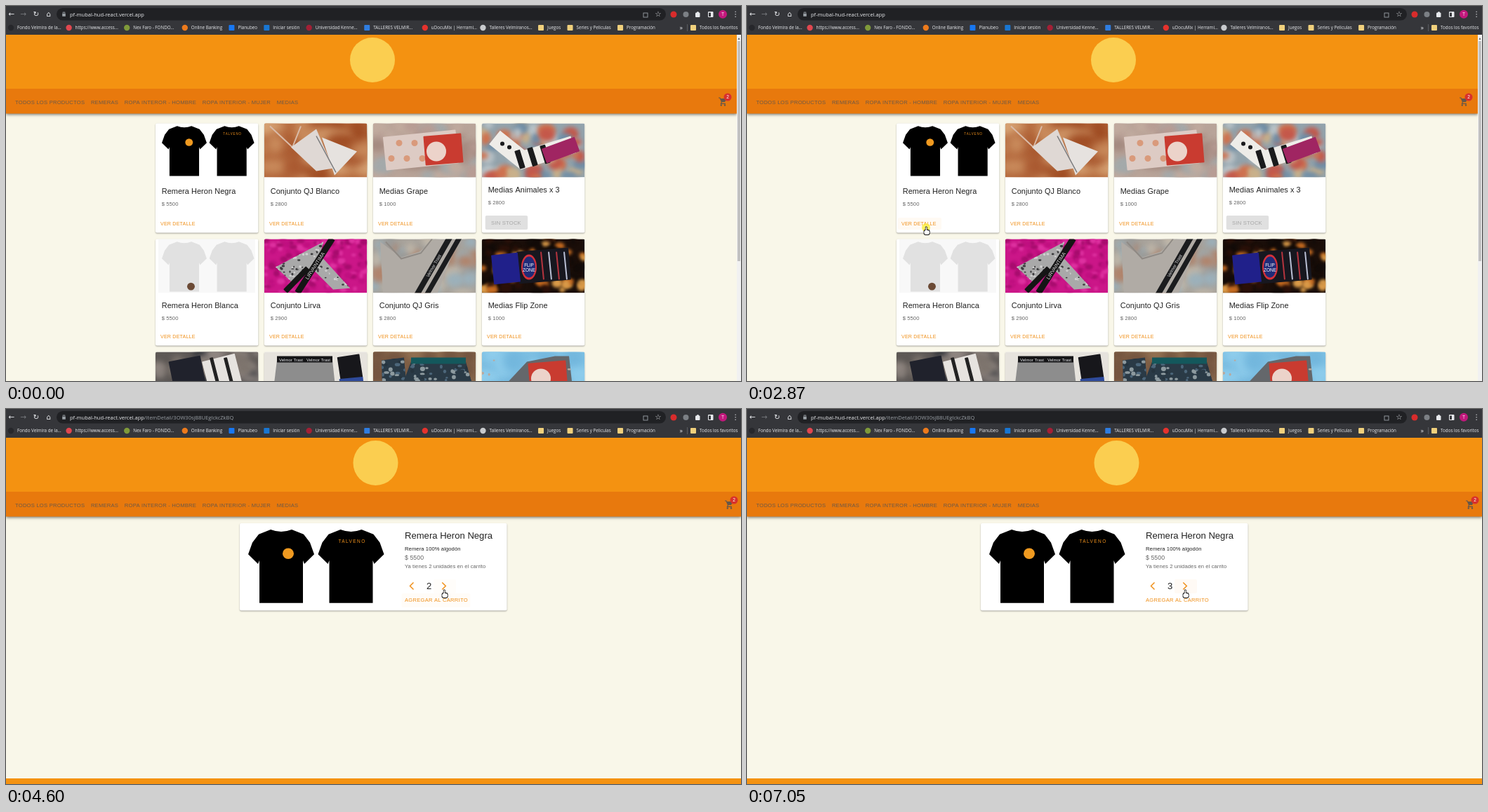
Recreate the animation shown at these times as an HTML page with a canvas. Size 1047 by 535 pixels, loop 8000 ms.

```html
<!DOCTYPE html>
<html lang="es">
<head>
<meta charset="utf-8">
<title>Tienda</title>
<style>
html, body { margin: 0; width: 100%; height: 100%; overflow: hidden; background: #f9f7e9; }
canvas { display: block; width: 1047px; height: 535px; }
</style>
</head>
<body>
<canvas id="stage" width="1047" height="535"></canvas>
<script>
const W = 1047, H = 535, LOOP = 8000, SCALE = W / 1920;
const ORANGE = '#f0911c', INK = '#212121', GREY = '#666', PAPER = '#f9f7e9', LIGHT = '#e8eaed';
const SANS = '"Liberation Sans", Arial, sans-serif', UI = '"Open Sans", sans-serif', GLYPHS = '"DejaVu Sans", sans-serif';
// Type styles: size and letter spacing in unscaled pixels
const STYLES = { h5: [24, 0], h6: [20, .15], price: [16, .15], body: [14, .15], button: [14, .4], small: [13, .37] };
const stage = document.getElementById('stage').getContext('2d');
let c = stage;

// Drawing helpers
function rect(color, x, y, w, h, r = 0) {
  c.fillStyle = color;
  c.beginPath();
  c.roundRect(x, y, w, h, r);
  c.fill();
}
function disc(color, x, y, r, ry = r) {
  c.fillStyle = color;
  c.beginPath();
  c.ellipse(x, y, r, ry, 0, 0, 7);
  c.fill();
}
function trace(points) {
  c.beginPath();
  for (let i = 0; i < points.length; i += 2) c.lineTo(points[i], points[i + 1]);
}
function poly(color, ...points) {
  trace(points);
  c.fillStyle = color;
  c.fill();
}
function line(color, width, ...points) {
  trace(points);
  c.strokeStyle = color;
  c.lineWidth = width;
  c.stroke();
}
function slab(color, x, y, w, h, angle, caption) {
  c.save();
  c.translate(x, y);
  c.rotate(angle);
  rect(color, -w / 2, -h / 2, w, h, 1);
  if (caption) text(caption, 0, h * .3, h * .8, '#ddd', 0, SANS, 'center');
  c.restore();
}
function text(s, x, y, size, color, spacing = 0, font = SANS, align = 'left') {
  c.font = size + 'px ' + font;
  c.letterSpacing = spacing + 'px';
  c.textAlign = align;
  c.fillStyle = color;
  c.fillText(s, x, y);
  return c.measureText(s).width;
}
function type(style, s, x, y, color = GREY, align) {
  const [size, spacing] = STYLES[style];
  return text(s, x, y, size * SCALE, color, spacing * SCALE, SANS, align);
}
function card(x, y, w, h) {
  c.save();
  c.shadowColor = 'rgba(0,0,0,.35)';
  c.shadowBlur = 2;
  c.shadowOffsetY = 1;
  rect('#fff', x, y, w, h, 2);
  c.restore();
}

// Browser frame
function browser(path) {
  rect('#35363a', 0, 0, W, 41);
  rect('#202124', 72, 3, 868, 17.5, 9);
  const icons = { '←': 8, '→': 25, '↻': 43, '⌂': 60.5, '☆': 929, '⋮': 1039 };
  for (const icon in icons)
    text(icon, icons[icon], 15.3, 10.5, icon === '→' ? '#77797d' : LIGHT, 0, GLYPHS, 'center');
  rect('#9aa0a6', 80.2, 11, 4.6, 3.8);
  c.strokeStyle = '#9aa0a6';
  c.lineWidth = .9;
  c.strokeRect(81.2, 9, 2.6, 2.5);
  c.strokeRect(908, 10, 6, 6);
  const host = text('pf-mubal-hud-react.vercel.app', 91, 14.5, 7.5, LIGHT, 0, UI);
  if (path) text(path, 91 + host, 14.5, 7.5, '#9aa0a6', 0, UI);
  disc('#d92c2c', 951, 12, 4.5);
  disc('#7c8085', 968.5, 12, 4);
  rect(LIGHT, 982, 9.5, 6.5, 6.5, 1);
  disc(LIGHT, 985.5, 9.5, 1.6);
  rect(LIGHT, 1000, 8, 7.5, 8, 1);
  rect('#35363a', 1001, 9.5, 3, 5.5);
  disc('#c2187c', 1021, 11.8, 6);
  text('T', 1021, 14.2, 6.5, '#fff', 0, UI, 'center');
  bookmarks();
}
function bookmark(name, x, shape, color) {
  if (shape === 'disc') disc(color, x - 9, 31, 4.2);
  else rect(color, x - 13, 27, 8, 8, 1);
  return text(name, x, 33.3, 6.25, LIGHT, 0, UI);
}
function bookmarks() {
  const folder = '#f0d07c', items = [
    ['Fondo Velmira de la...', 'disc', '#26272b'], ['https://www.access...', 'disc', '#e0474f'],
    ['Nex Faro - FONDO...', 'disc', '#7f9a3a'], ['Online Banking', 'disc', '#ec7a1c'],
    ['Planubeo', 'square', '#1877f2'], ['Iniciar sesión', 'square', '#1976d2'],
    ['Universidad Kenne...', 'disc', '#a32035'], ['TALLERES VELMIR...', 'square', '#2f7de0'],
    ['uDocuMix | Herrami...', 'disc', '#e5322d'], ['Talleres Velmiranos...', 'disc', '#c8cacd'],
    ['Juegos', 'square', folder], ['Series y Peliculas', 'square', folder], ['Programación', 'square', folder]
  ];
  let x = 16;
  for (const [name, shape, color] of items) {
    const width = bookmark(name, x, shape, color);
    x += (name.endsWith('...') ? 60.3 : width) + 22.3; // shortened names share one width
  }
  text('»', 959.5, 33.5, 9, LIGHT, 0, UI);
  rect('#65686c', 970, 26, .8, 10);
  bookmark('Todos los favoritos', 988, 'square', folder);
}

function header(width) {
  const shift = width > 1041 ? 9 : 0, ink = '#65574a';
  rect(PAPER, 0, 41, W, H);
  c.save();
  c.shadowColor = 'rgba(0,0,0,.5)';
  c.shadowBlur = 4;
  c.shadowOffsetY = 1.5;
  rect('#e8790d', 0, 118, width, 35.5);
  c.restore();
  rect('#f49211', 0, 41, width, 77);
  disc('#fbce50', 522 + shift / 2, 77, 32);
  let x = 13;
  for (const name of ['TODOS LOS PRODUCTOS', 'REMERAS', 'ROPA INTEROR - HOMBRE', 'ROPA INTERIOR - MUJER', 'MEDIAS'])
    x += type('button', name, x, 139.5, '#6d5947') + 8.7;
  c.save();
  c.translate(1015 + shift, 131);
  line(ink, 1.2, 0, 0, 2, 0, 4.5, 6, 3.5, 8.3, 10, 8.3);
  poly(ink, 2.5, 1, 11.5, 1, 9, 6, 4.5, 6);
  disc(ink, 3.8, 10.5, 1.2);
  disc(ink, 9, 10.5, 1.2);
  disc('#d8302c', 13, -1, 5.5);
  text('2', 13, 1.4, 6.6, '#fff', 0, SANS, 'center');
  c.restore();
}

// Product pictures, each 146 by 77
function scatter(seed, count, size, ...colors) {
  const random = () => (seed = seed * 16807 % 2147483647) / 2147483647;
  for (let i = 0; i < count; i++)
    disc(colors[i % colors.length], random() * 146, random() * 77, size * (.4 + random() * .6), size * (.3 + random() * .5));
}
function backdrop(seed, size, base, ...colors) {
  rect(base, 0, 0, 146, 77);
  c.filter = `blur(${size / 4}px)`;
  scatter(seed, 900 / size, size, ...colors);
  c.filter = 'none';
}
function patterned(seed, size, colors, ...points) {
  c.save();
  poly(colors[0], ...points);
  c.clip();
  scatter(seed, 900 / size, size, ...colors);
  c.restore();
}
function tee(cx) {
  const half = [[15, 1], [32, 8], [41, 20], [47, 37], [33, 51], [31, 46], [31, 108]];
  c.beginPath();
  for (const [x, y] of half) c.lineTo(cx + x, y);
  for (const [x, y] of half.reverse()) c.lineTo(cx - x, y);
  c.quadraticCurveTo(cx, 7, cx + 15, 1);
  c.fill();
}
function shirts(x, y, scale, color, badge, badgeX, badgeY) {
  c.save();
  c.translate(x, y);
  c.scale(scale, scale * .98);
  c.fillStyle = color;
  tee(47);
  tee(146.5);
  disc(badge, badgeX, badgeY, 8);
  c.restore();
}
function eagleTees(x, y, scale) {
  shirts(x, y, scale, '#000', '#f09a20', 57, 36);
  text('TALVENO', x + 148 * scale, y + 20 * scale, 6.5 * scale, ORANGE, 1.4 * scale, SANS, 'center');
}
function redPack(x, y) {
  slab('#c93b30', x + 10, y - 3, 54, 42, -.08);
  disc('#ecd3ca', x, y, 14);
}
const photos = [
  () => eagleTees(9, 3, .68),
  () => {
    backdrop(11, 26, '#b4673a', '#c98b5c', '#a04d24', '#d6a273', '#aa5a31');
    line('#d9bba8', 2, 8, 4, 40, 34, 52, 4);
    poly('#dfd8d4', 38, 34, 74, 8, 98, 64, 74, 68);
    poly('#e6e2df', 82, 20, 132, 40, 100, 74);
    line('#77787a', 1.5, 74, 18, 102, 70);
  },
  () => {
    backdrop(23, 18, '#b8a499', '#c0aa9e', '#a48a80', '#b79c94', '#a3a9aa');
    slab('#ddcbc4', 68, 38, 104, 48, -.1);
    for (let i = 0; i < 5; i++) disc('#d99a7b', 26 + i * 11, i % 2 ? 28 : 50, 4.5);
    redPack(90, 40);
  },
  () => {
    backdrop(47, 13, '#93a3ac', '#c9b08a', '#d0714c', '#6f8da6', '#b9c3c8', '#c4584a');
    line('#eeece8', 25, 18, 20, 58, 52, 130, 30);
    for (const x of [54, 72, 90]) slab('#1a1a1c', x, 62 - x / 5, 8, 27, -.3);
    slab('#a02562', 112, 38, 50, 22, -.35);
    disc('#1a1a1c', 29, 29, 3);
    disc('#1a1a1c', 39, 34, 3);
  },
  () => {
    rect('#f8f8f8', 4, 0, 138, 77);
    shirts(9, 3, .68, '#e1e1e1', '#6b4a35', 61, 97);
  },
  () => {
    const zebra = ['#a9a9a9', '#3c3c3e', '#d0d0d0'];
    backdrop(5, 6, '#cb1688', '#dd309f', '#a80c6e', '#c01080');
    patterned(31, 2.4, zebra, 16, 40, 84, 4, 76, 36, 40, 62);
    patterned(37, 2.4, zebra, 64, 38, 84, 28, 122, 70, 98, 72);
    slab('#151515', 72, 38, 92, 9, -1, 'LIRVAINTIMA');
    slab('#151515', 46, 58, 46, 8, -.8);
  },
  () => {
    backdrop(67, 16, '#a7a29b', '#9bb0ba', '#b0846c', '#9a9a98', '#bfb6a8');
    poly('#b0aba5', 10, 4, 40, 26, 66, 18, 88, 0, 120, 2, 92, 77, 14, 77);
    line('#8f8a85', 2, 18, 4, 40, 28, 68, 20, 84, 0);
    slab('#1b1c1e', 86, 38, 100, 8, -1.05, 'Velmor Trast');
    slab('#1b1c1e', 100, 38, 100, 7, -1.05);
  },
  () => {
    backdrop(83, 9, '#1a0e09', '#c46a20', '#2a1008', '#120b08', '#d99a48', '#120b08');
    slab('#17171f', 88, 38, 74, 46, -.08);
    slab('#20208a', 34, 42, 38, 42, -.1);
    for (let i = 0; i < 4; i++) slab(i % 2 ? '#b9bfd4' : '#b5343e', 86 + i * 11, 38, 2, 40, -.1);
    disc('#d5303a', 67, 40, 11, 18);
    disc('#202b78', 67, 40, 9, 15);
    text('FLIP', 67, 39, 6.5, '#fff', 0, SANS, 'center');
    text('ZONE', 67, 46, 6.5, '#fff', 0, SANS, 'center');
  },
  () => {
    backdrop(91, 16, '#5d5855', '#7d746d', '#34363c', '#8e8580');
    slab('#20222c', 46, 34, 46, 50, -.2);
    slab('#e6e3df', 98, 42, 48, 70, -.25);
    for (const x of [88, 108]) slab('#222', x, 42, 5, 70, -.25);
  },
  () => {
    rect('#e6e3dd', 0, 0, 146, 77);
    poly('#8d8d8d', 18, 12, 97, 12, 104, 77, 10, 77);
    rect('#151517', 18, 6, 79, 9);
    for (const x of [38, 77]) text('Velmor Trast', x, 13, 6, LIGHT, 0, SANS, 'center');
    slab('#17171b', 122, 22, 32, 34, -.15);
    slab('#2e4a9a', 124, 42, 34, 10, -.1);
  },
  () => {
    backdrop(19, 20, '#85664b', '#927051', '#755640');
    const print = ['#2a3a46', '#8d9a9f', '#4c667a', '#26343e'];
    patterned(13, 4, print, 12, 12, 44, 8, 50, 77, 14, 77);
    patterned(17, 4, print, 54, 14, 132, 14, 150, 77, 30, 77);
    rect('#14585c', 54, 8, 78, 9);
  },
  () => {
    backdrop(29, 24, '#7fc3e6', '#8fcdec', '#73b7dd');
    poly('#64676b', 36, 44, 64, 14, 104, 6, 124, 6, 132, 77);
    scatter(41, 6, 3, '#b9a89c');
    redPack(84, 38);
  }
];
const products = [['Remera Heron Negra', 5500], ['Conjunto QJ Blanco', 2800], ['Medias Grape', 1000], ['Medias Animales x 3', 2800],
  ['Remera Heron Blanca', 5500], ['Conjunto Lirva', 2900], ['Conjunto QJ Gris', 2800], ['Medias Flip Zone', 1000]];

// Pages
function catalogue() {
  browser();
  header(1041);
  rect('#f1f1f1', 1041, 41, 6, H);
  rect('#c1c1c1', 1042, 50, 4, 314);
  text('▴', 1044, 47.5, 6, '#606060', 0, GLYPHS, 'center');
  photos.forEach((paint, i) => {
    const row = Math.floor(i / 4), x = 213 + 155 * (i % 4), y = 167.5 + 163 * row + (row ? 2 : 0) - (row > 1 ? 2 : 0);
    const soldOut = i === 3, title = y + (soldOut ? 98.5 : row ? 98.5 : 100.5);
    card(x, y, 146.3, row ? 152 : 156);
    c.save();
    c.translate(x, y);
    c.beginPath();
    c.roundRect(0, 0, 146.3, 76.7, [2, 2, 0, 0]);
    c.clip();
    paint();
    c.restore();
    if (!products[i]) return;
    const [name, price] = products[i];
    type('h6', name, x + 8.7, title, INK);
    type('body', '$ ' + price, x + 8.7, title + 17);
    if (soldOut) {
      rect('#e0e0e0', x + 4.7, y + 131.5, 60.5, 20, 2);
      type('button', 'SIN STOCK', x + 13, y + 144.1, '#a6a6a6');
    } else type('small', 'VER DETALLE', x + 7, title + (row ? 43 : 44.7), ORANGE);
  });
}
function detailFrame() {
  browser('/itemDetail/3OW30sjB8UEgIckcZkBQ');
  header(W);
  rect('#f49211', 0, 527, W, 8);
}
function chevrons(x, y, gap) {
  for (const side of [-1, 1]) {
    const tip = x + side * gap;
    line(ORANGE, 1.5, tip - 2.5 * side, y - 5, tip + 2.5 * side, y, tip - 2.5 * side, y + 5);
  }
}
function loading() {
  detailFrame();
  card(457, 163, 133, 130);
  c.strokeStyle = '#bbb';
  c.lineWidth = .8;
  c.strokeRect(457.4, 163.4, 43.2, 129.2);
  type('price', '$', 509.5, 185);
  ['Ya tienes 2', 'unidades en el', 'carrito'].forEach((s, i) => type('body', s, 509.5, 197 + i * 11));
  chevrons(542.3, 245, 23.2);
  type('h5', '2', 543.7, 248.5, INK, 'center');
  type('button', 'AGREGAR AL', 545, 267.6, ORANGE, 'center');
  type('button', 'CARRITO', 545, 281.2, ORANGE, 'center');
}
function detail() {
  detailFrame();
  card(333, 163, 380.5, 124.5);
  eagleTees(345, 171, 1);
  type('h5', 'Remera Heron Negra', 568, 184.8, INK);
  type('body', 'Remera 100% algodón', 568, 201.7, INK);
  type('price', '$ 5500', 568, 215);
  type('body', 'Ya tienes 2 unidades en el carrito', 568, 227);
  chevrons(600.9, 252.5, 22.9);
  type('button', 'AGREGAR AL CARRITO', 568, 275.2, ORANGE);
}
function cached(paint) {
  const sheet = document.createElement('canvas');
  sheet.width = W;
  sheet.height = H;
  c = sheet.getContext('2d');
  paint();
  c = stage;
  return sheet;
}
const pages = [catalogue, loading, detail].map(cached);

// Pointer and interaction
const box = (page, x, y, w, h) => ({ page, x, y, w, h });
const VIEW = box(0, 215, 302, 62, 17), LESS = box(2, 563.5, 243, 31, 20);
const MORE = box(2, 609, 243, 32, 20), ADD = box(2, 563.5, 263, 98, 20), buttons = [VIEW, LESS, MORE, ADD];
const overMore = [624, 257.5];
const moves = [
  { from: 260, to: 1030, end: [347, 237], lift: 143 }, { from: 1030, to: 1850, end: [294, 205] },
  { from: 1850, to: 2610, end: [255, 314.5] }, { from: 3200, to: 3910, end: [612, 274] },
  { from: 4390, to: 4600, end: overMore }, { from: 4880, to: 5090, end: [579, 256] },
  { from: 5430, to: 5640, end: overMore }
];
const clicks = [{ on: VIEW, at: 2870, add: 0 }, { on: LESS, at: 5100, add: -1 },
  { on: MORE, at: 5850, add: 1 }, { on: MORE, at: 6410, add: 1 }];

const clamp = v => Math.max(0, Math.min(1, v));
const pageAt = t => t < 3000 ? 0 : t < 3200 ? 1 : 2;

function pointer(time) {
  const t = 260 + Math.floor((time - 260) / 70) * 70;
  let x = 981, y = 505;
  for (const { from, to, end, lift = 0 } of moves) {
    const p = clamp((t - from) / (to - from)), e = p * p * (3 - 2 * p);
    x += (end[0] - x) * e;
    y += (end[1] - y) * e - lift * Math.sin(Math.PI * e);
  }
  return [x, y];
}
function isOver(b, t) {
  const [x, y] = pointer(t);
  return pageAt(t) === b.page && x > b.x && x < b.x + b.w && y > b.y && y < b.y + b.h;
}
function drawPointer(x, y, hand) {
  c.save();
  c.translate(x, y);
  if (hand) {
    for (const [color, inset] of [['#111', 0], ['#fff', .8]]) {
      rect(color, -3.4 + inset, 4.6 + inset, 9 - 2 * inset, 7.8 - 2 * inset, 2.4);
      rect(color, -1.2 + inset, inset, 3 - 2 * inset, 9 - 2 * inset, 1.4);
    }
  } else {
    const arrow = [0, 0, 0, 9, 2, 7.2, 3.4, 10.2, 4.8, 9.6, 3.4, 6.6, 6.2, 6.6, 0, 0];
    poly('#fff', ...arrow);
    line('#111', .8, ...arrow);
  }
  c.restore();
}
function draw(t) {
  const page = pageAt(t), [x, y] = pointer(t);
  c.drawImage(pages[page], 0, 0);
  if (page === 2) {
    const count = clicks.reduce((n, click) => t > click.at + 100 ? n + click.add : n, 2);
    type('h5', String(count), 602.6, 256.7, INK, 'center');
  }
  // Hover tint follows the pointer with a short fade
  for (const b of buttons) {
    if (b.page !== page) continue;
    let tint = 0;
    for (let lag = 0; lag < 250; lag += 50) tint += isOver(b, t - lag) ? .009 : 0;
    rect(`rgba(245,135,20,${tint})`, b.x, b.y, b.w, b.h, 2);
  }
  for (const { on, at } of clicks) {
    const age = t - at;
    if (on.page !== page || age < 0 || age > 420) continue;
    c.save();
    c.beginPath();
    c.rect(on.x, on.y, on.w, on.h);
    c.clip();
    disc(`rgba(245,145,20,${.22 * (1 - age / 420)})`, x, y, clamp(age / 260) * 34);
    c.restore();
    if (age < 130) disc('rgba(250,238,50,.75)', x, y + 1.5, 6);
  }
  if (t >= 260) drawPointer(x, y, buttons.some(b => isOver(b, t)));
}
function tick() {
  draw(performance.now() % LOOP);
  requestAnimationFrame(tick);
}
tick();
</script>
</body>
</html>
```
